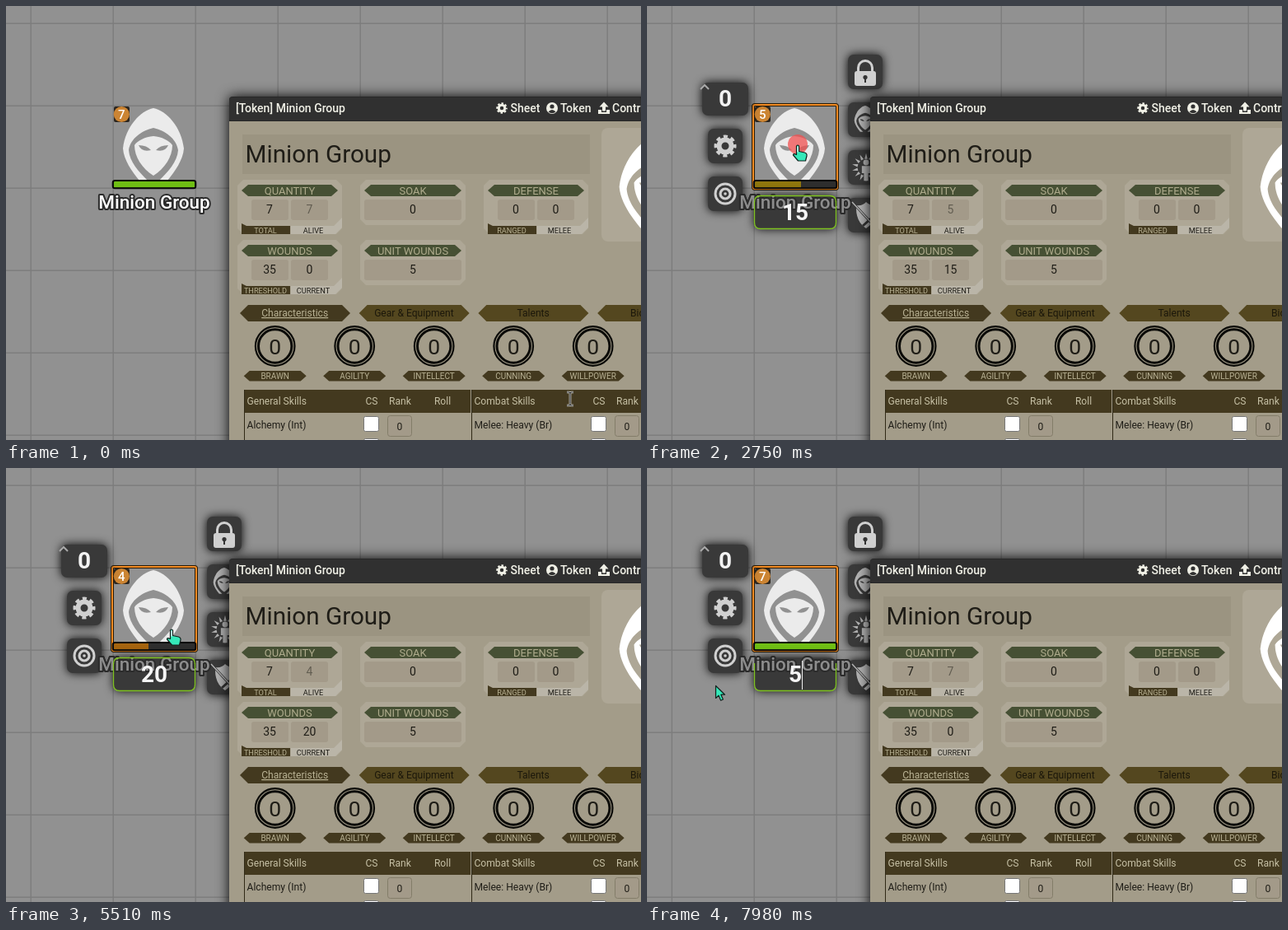
These frames come from a looping animation (771 px wide and 527 px high, 8000 ms). An HTML page:

```html
<!DOCTYPE html>
<html lang="en">
<head>
<meta charset="utf-8">
<title>Minion group wounds</title>
<style>
  html, body { margin: 0; width: 100%; height: 100%; overflow: hidden; background: #919191; }
  svg { display: block; font-family: Roboto, "Open Sans", sans-serif; }
  .box { fill: #393939; filter: drop-shadow(0 0 6px #000); }
  .sheet { filter: drop-shadow(0 0 8px #000); }
  .label { paint-order: stroke; stroke: #2b2b2b; stroke-width: 4px; stroke-linejoin: round; font-weight: 500; }
</style>
</head>
<body>
<svg id="stage" width="771" height="527" viewBox="0 0 771 527"></svg>
<script>
const TICK = 130.9, LOOP = 8000;
const DARK = '#43391f', TAN = '#a39c89', PANEL = '#aea796', FIELD = '#a39a89', INK = '#1f1d17', PALE = '#b9b294';

// Drawing helpers, each returning SVG markup
const rect = (x, y, w, h, fill, more = '') =>
  `<rect x="${x}" y="${y}" width="${w}" height="${h}" fill="${fill}" ${more}/>`;
const text = (s, x, y, size, fill, more = 'text-anchor="middle"') =>
  `<text x="${x}" y="${y}" font-size="${size}" fill="${fill}" ${more}>${s}</text>`;
const path = (d, fill, more = '') => `<path d="${d}" fill="${fill}" ${more}/>`;
const ring = (x, y, r, w, color, more = '') =>
  `<circle cx="${x}" cy="${y}" r="${r}" fill="none" stroke="${color}" stroke-width="${w}" ${more}/>`;
const disc = (x, y, r, fill, more = '') => `<circle cx="${x}" cy="${y}" r="${r}" fill="${fill}" ${more}/>`;
const group = (id, inner, more = '') => `<g id="${id}" ${more}>${inner}</g>`;
const hex = (x, y, w, h, c, fill) =>
  path(`M${x} ${y + h / 2}l${c} ${-h / 2}h${w - 2 * c}l${c} ${h / 2}l${-c} ${h / 2}h${2 * c - w}Z`, fill);
const cut = (x, y, w, h, c, fill) =>
  path(`M${x + c} ${y}h${w - 2 * c}l${c} ${c}v${h - 2 * c}l${-c} ${c}h${2 * c - w}l${-c} ${-c}v${2 * c - h}Z`, fill);
const range = (n, f) => Array.from({ length: n }, (_, i) => f(i)).join('');

const gear = (x, y, s, color) => `<g transform="translate(${x} ${y}) scale(${s})">` +
  ring(0, 0, 7.5, 6, color) + ring(0, 0, 11, 5, color, 'stroke-dasharray="4.8 3.84" stroke-dashoffset="2.4"') + '</g>';

// Hooded figure in a 100 unit square
const cowl = (x, y, s, color) => path(
  'M50 3C66 6 84 26 87 52C86 66 76 80 67 91L57 91C68 80 79 68 80 54C78 40 64 30 50 27C36 30 22 40 20 54C21 68 32 80 43 91L33 91C24 80 14 66 13 52C16 26 34 6 50 3Z' +
  'M50 37C60 38 69 42 73 48C73 62 64 76 50 85C36 76 27 62 27 48C31 42 40 38 50 37Z' +
  'M32 48Q42 48 47 54Q36 57 32 48ZM68 48Q58 48 53 54Q64 57 68 48Z',
  color, `fill-rule="evenodd" transform="translate(${x} ${y}) scale(${s})"`);

function scene() {
  let s = rect(0, 0, 771, 527, '#919191');
  for (let x = 30; x < 771; x += 100) s += rect(x - .5, 0, 1.4, 527, '#7d7d7d');
  for (let y = 21; y < 527; y += 100) s += rect(0, y - .5, 771, 1.4, '#7d7d7d');
  return s;
}

function token() {
  return cowl(129, 121, 1, '#ebebeb') +
    group('hover', rect(129, 120, 102, 102, 'none', 'rx="2" stroke="#2a1c08" stroke-width="4"') +
      rect(129, 120, 102, 102, 'none', 'rx="2" stroke="#f08a24" stroke-width="2"')) +
    rect(131, 122, 19, 19, '#2b2620', 'rx="2"') + disc(140.3, 131.5, 9.6, '#cb8433') +
    text('7', 140.3, 137, 15, '#fff', 'id="badge" text-anchor="middle" font-weight="500"') +
    rect(130, 212, 100, 9, '#2e2e2e', 'rx="2"') +
    rect(131, 213, 98, 7.5, '#6fbe14', 'id="bar"') +
    rect(129.7, 212, 100.6, 9.3, 'none', 'rx="2.5" stroke="#080808" stroke-width="2"') +
    text('Minion Group', 180, 245.5, 22.5, '#fff', 'class="label" text-anchor="middle"');
}

function hud() {
  const icon = '#d0d0d0', dim = '#b2b2b2', green = 'stroke="#7fc320" stroke-width="1.3"';
  const box = (x, y, w = 42, h = 42) => rect(x, y, w, h, '', `rx="7" class="box"`);
  const rays = range(14, i => `<path d="M-2 -12L0 -20L2 -12Z" transform="rotate(${i * 360 / 14})"/>`);
  return box(67, 93, 56, 40) + box(74, 149) + box(74, 207) + range(4, i => box(244, 59 + 58 * i)) +
    box(130.5, 230.5, 99, 40) +
    text('Minion Group', 180, 245.5, 22.5, '#8d8d8d', 'class="label" text-anchor="middle"') +
    path('M65 101l5 -5l5 5', 'none', 'stroke="#aaa" stroke-width="2"') +
    text('0', 95, 121.5, 28, '#f2f2f2', 'text-anchor="middle" font-weight="700"') +
    gear(95, 170, 1, icon) + ring(95, 228, 12, 3, icon) + ring(95, 228, 6, 3.2, icon) + disc(95, 228, 1.8, icon) +
    path('M256.5 80v-5a8.5 8.5 0 0 1 17 0v5', 'none', `stroke="${icon}" stroke-width="3"`) +
    rect(252, 79, 26, 18, icon, 'rx="3"') + disc(265, 86.5, 2.6, '#333') + rect(264, 87, 2, 6, '#333') +
    cowl(247, 120, .36, dim) +
    `<g transform="translate(266 196) scale(.86)" fill="${dim}">${rays}` +
      '<circle cy="-7" r="4"/><path d="M-6 -2h12v10h-3v11h-6v-11h-3Z"/></g>' +
    path('M254 242q8 1 12 -4q5 5 12 4q1 20 -12 28q-13 -8 -12 -28Z', dim) +
    path('M250 239l23 25M262 267l10 -9', 'none', 'stroke="#333" stroke-width="3"') +
    path('M249 238l25 27', 'none', `stroke="${dim}" stroke-width="1.5"`) +
    path('M130.5 237v26q0 7.5 7.5 7.5h84q7.5 0 7.5 -7.5v-26', 'none', green) +
    path('M130.5 238q0 -7.5 7.5 -7.5h84q7.5 0 7.5 7.5', 'none', 'id="rim" ' + green) +
    rect(172, 232, 16, 38, '#858585', 'id="mark"') +
    text('0', 180, 260, 28, '#f5f5f5', 'id="value" text-anchor="middle" font-weight="700"') +
    rect(188, 234, 1, 35, '#eee', 'id="caret"');
}

// A stat panel with one wide or two narrow values and optional tags
function stat(x, y, title, values, tags, ids = []) {
  const wide = values.length < 2, w = wide ? 128 : 127;
  let s = cut(x, y, w, tags ? 66 : 55, 7, PANEL) + hex(x + 5, y + 6, w - 10, 14, 8, '#465034') +
    text(title, x + w / 2, y + 17.8, 13, '#aeab8c');
  values.forEach((v, i) => {
    s += rect(wide ? x + 5 : x + 17 + 48 * i, y + 24, wide ? 118 : 45, 25, FIELD, 'rx="3"') +
      text(v, wide ? x + 64 : x + 39 + 48.5 * i, y + 41, 14, title === 'QUANTITY' && i ? '#625d51' : INK,
        `text-anchor="middle" id="${ids[i] || ''}"`);
  });
  if (tags) {
    s += path(`M${x + 5} ${y + 53}l6 3h53v10h-59Z`, DARK) +
      path(`M${x + 65} ${y + 56}h52l10 -10v12l-8 8h-54Z`, '#bab5a8') +
      text(tags[0], x + 34, y + 64.5, 9.2, PALE) + text(tags[1], x + 92, y + 64.5, 9.2, INK);
  }
  return s;
}

function skills(x, title, skill) {
  const at = [['CS', 155], ['Rank', 189.5], ['Roll', 241]];
  return rect(x, 466, 275, 28, DARK) + text(title, x + 3.5, 484, 12.1, '#c6c0a5', '') +
    at.map(([t, dx]) => text(t, x + dx, 484, 12.1, '#c6c0a5')).join('') +
    rect(x, 466, 1, 61, '#302916') +
    text(skill, x + 3.5, 513, 12.1, INK, '') +
    rect(x + 145.5, 498.5, 18, 18, '#fff', 'rx="2" stroke="#767676"') +
    rect(x + 174.5, 497.5, 29, 25, FIELD, 'rx="3" stroke="#837d69"') +
    text('0', x + 189, 514.5, 12.1, INK) +
    rect(x + 145.5, 525.5, 18, 8, '#fff', 'rx="2" stroke="#767676"');
}

function sheet() {
  const left = 'font-weight="500"', white = '#f0f0e6';
  let s = rect(271, 110, 520, 440, '#282828', 'class="sheet" rx="4"') + rect(271, 111, 500, 28, '#303030', 'rx="3"') +
    rect(271, 140, 500, 390, TAN) +
    text('[Token] Minion Group', 279, 129, 14, white, left) +
    gear(602, 124, .5, white) + text('Sheet', 612.5, 129, 14, white, left) +
    disc(663, 124, 7, white) + disc(663, 122, 2.6, '#303030') + path('M658.5 128.5q4.5 -5 9 0q-4.5 3.5 -9 0Z', '#303030') +
    text('Token', 673, 129, 14, white, left) +
    path('M726 116.5l5.5 6h-3.5v5h-4v-5h-3.5ZM719 126h4v3h6v-3h4v5h-14Z', white) +
    text('Contr', 736, 129, 14, white, left) +
    rect(287, 156, 422, 48, '#9b9481') + text('Minion Group', 290.5, 190, 29.7, INK, '') +
    rect(723, 148, 60, 138, PANEL, 'rx="8"') + cowl(728, 153, 1.28, '#fff');

  s += stat(281, 211, 'QUANTITY', [7, 7], ['TOTAL', 'ALIVE'], ['', 'alive']) + stat(430, 211, 'SOAK', [0]) +
    stat(580, 211, 'DEFENSE', [0, 0], ['RANGED', 'MELEE']) +
    stat(281, 284, 'WOUNDS', [35, 0], ['THRESHOLD', 'CURRENT'], ['', 'wounds']) +
    stat(430, 284, 'UNIT WOUNDS', [5]);

  ['Characteristics', 'Gear &amp; Equipment', 'Talents', 'Biography'].forEach((t, i) => {
    const x = 284 + 144.7 * i;
    s += hex(x, 363, 134, 20, 10, i ? '#54471f' : DARK) +
      text(t, x + 66.7, 377, 12.1, i ? '#1c180b' : PALE,
        `text-anchor="middle" ${i ? '' : 'text-decoration="underline"'}`);
  });
  ['BRAWN', 'AGILITY', 'INTELLECT', 'CUNNING', 'WILLPOWER'].forEach((t, i) => {
    const x = 326.7 + 96.5 * i;
    s += ring(x, 413, 23.8, 2.2, '#0b0b08') + ring(x, 413, 20.2, 3, '#0b0b08') + text(0, x, 422.5, 26.5, INK) +
      hex(x - 38, 443, 76, 12.5, 7, DARK) + text(t, x, 453, 10, PALE);
  });
  return s + skills(289, 'General Skills', 'Alchemy (Int)') + skills(565, 'Combat Skills', 'Melee: Heavy (Br)');
}

function pointer() {
  const edge = 'stroke="#10201c" stroke-width="1.2" stroke-linejoin="round"';
  const beam = 'M-4 -8h3l1 1l1 -1h3M0 -7v14M-4 8h3l1 -1l1 1h3';
  return disc(0, -1, 12, '#f05050', 'id="click" opacity=".75"') +
    group('arrow', path('M.5 .5V15.5L4 12.2L6.6 18.2L9.4 17L6.8 11.2H11.5Z', '#35e8b9', edge)) +
    group('hand', path('M-1.5 1q1.5 -2 3 0v6.5l7 1.5q3 1 2.5 4l-1.5 6h-9l-6 -7q0 -2.5 4 -.5Z', '#35e8b9', edge) +
      path('M-.6 1.6h1.4v7h-1.4Z', '#e8fff8')) +
    group('beam', path(beam, 'none', 'stroke="#e6e6e0" stroke-width="2.6"') +
      path(beam, 'none', 'stroke="#222" stroke-width="1.2"'));
}

const $ = id => document.getElementById(id);
$('stage').innerHTML = scene() + token() + group('hud', hud()) + sheet() + group('pointer', pointer());

// Pointer route: tick, x, y
const route = [
  [0, 685, 477], [3, 190, 185], [4, 185, 178], [5, 185, 178], [6, 181, 240], [7, 110, 258], [8, 37, 256],
  [9, 49, 247], [12, 49, 247], [13, 80, 330], [15, 200, 462], [17, 185, 286], [19, 183, 180], [20, 183, 169],
  [22, 183, 169], [24, 187, 215], [25, 95, 262], [26, 107, 262], [33, 107, 262], [35, 150, 258], [37, 190, 338],
  [39, 201, 200], [40, 201, 196], [42, 201, 196], [43, 188, 240], [44, 180, 250], [45, 90, 270], [46, 60, 300],
  [49, 150, 414], [50, 380, 436], [51, 636, 400], [53, 191, 202], [56, 191, 202], [58, 182, 250], [60, 83, 264]
];
// What the user does: tick, action; numbers are typed text
const actions = [
  [4, 'press'], [5, 'open'], [6, 'release'], [7, 'select'], [11, '1'], [12, '15'], [13, 'enter'],
  [20, 'press'], [21, 'open'], [22, 'release'], [25, 'select'], [31, '2'], [33, '20'], [36, 'enter'],
  [40, 'press'], [41, 'open'], [42, 'release'], [44, 'select'], [47, '0'], [50, 'enter'],
  [55, 'press'], [56, 'open'], [57, 'release'], [58, 'select'], [61, '5']
];

function pointAt(k) {
  const i = route.findIndex(p => p[0] > k);
  if (i < 0) return route[route.length - 1].slice(1);
  const [a, b] = [route[i - 1], route[i]], u = (k - a[0]) / (b[0] - a[0]);
  return [1, 2].map(j => a[j] + (b[j] - a[j]) * u);
}

function stateAt(k) {
  const s = { wounds: 0, value: '0', click: false, hud: false, mark: false, caret: false };
  for (const [at, act] of actions) {
    if (at > k) break;
    if (act === 'press') s.click = true;
    else if (act === 'release') s.click = false;
    else if (act === 'open') s.hud = true;
    else if (act === 'select') s.mark = true;
    else if (act === 'enter') { s.wounds = +s.value; s.hud = s.mark = s.caret = false; }
    else { s.value = act; s.mark = false; s.caret = true; }
  }
  return s;
}

const show = (id, on) => { $(id).style.display = on ? '' : 'none'; };
const set = (id, attrs) => { for (const a in attrs) $(id).setAttribute(a, attrs[a]); };

function draw(k) {
  const s = stateAt(k), [x, y] = pointAt(k);
  const inside = (l, t, r, b) => x >= l && x <= r && y >= t && y <= b;
  const onToken = inside(128, 119, 232, 222);
  const onText = x > 680 || (s.hud && inside(130, 230, 230, 271));
  const alive = Math.min(7, 7 - Math.floor((s.wounds - 1) / 5));
  const half = s.value.length * 8;

  for (const id of ['hud', 'click', 'mark', 'caret']) show(id, s[id]);
  show('hover', onToken || s.hud);
  show('rim', !s.mark && !s.caret);
  show('hand', onToken);
  show('beam', onText);
  show('arrow', !onToken && !onText);
  $('badge').textContent = $('alive').textContent = alive;
  $('wounds').textContent = s.wounds;
  $('value').textContent = s.value;
  set('mark', { x: 180 - half, width: half * 2 });
  set('caret', { x: 180 + half });
  set('bar', {
    width: 98 * (1 - s.wounds / 35),
    fill: s.wounds === 0 ? '#6fbe14' : s.wounds < 20 ? '#8f760d' : '#a5640f'
  });
  set('pointer', { transform: `translate(${x} ${y})` });
}

let last = -1;
function frame() {
  const k = Math.floor((performance.now() % LOOP + 6) / TICK);
  if (k !== last) draw(last = k);
  requestAnimationFrame(frame);
}
frame();
</script>
</body>
</html>
```
